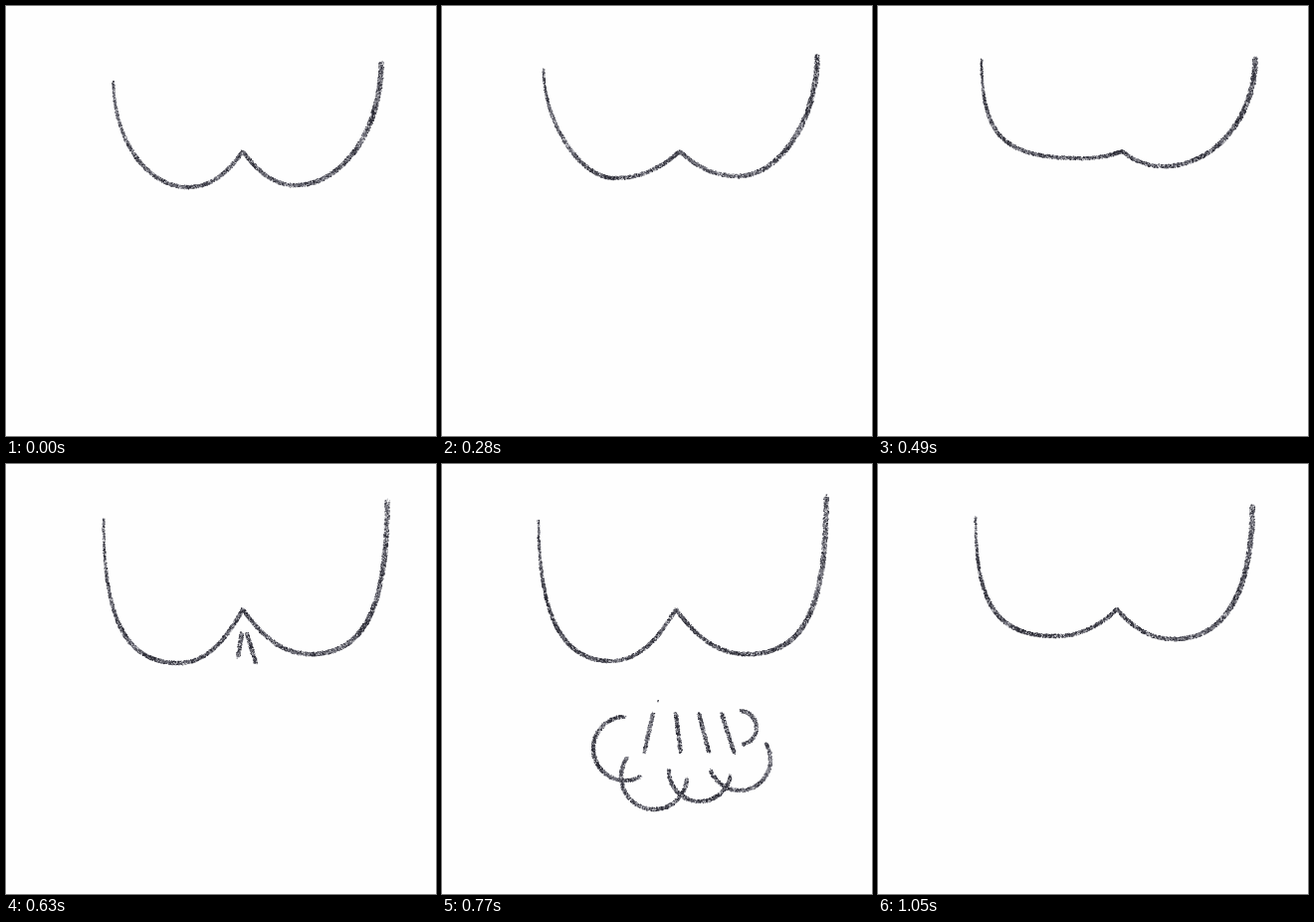
Recreate the animation shown at these times as an HTML page with a canvas. Size 432x432 px, loop 1120 ms.

```html
<!DOCTYPE html>
<html lang="en">
<head>
<meta charset="utf-8">
<title>Crayon puff</title>
<style>
  html, body { margin: 0; width: 100%; height: 100%; overflow: hidden; background: #fefefe; }
  canvas { display: block; width: 432px; height: 432px; }
</style>
</head>
<body>
<canvas id="stage" width="432" height="432"></canvas>
<script>
const ctx = document.getElementById('stage').getContext('2d');
const STEP = 70, STEPS = 16, CLEFT_Y = 146;

// A pose: outer end and lowest point of each lobe, the cleft's x,
// and how boxy each lobe is (0.55 is a plain ellipse).
const pose = (at, left, leftLow, cleft, rightLow, right, bulge) =>
  ({ at, values: [...left, ...leftLow, cleft, ...rightLow, ...right, ...bulge] });

const poses = [
  pose(0, [108, 76], [183, 182], 238, [291, 180], [377, 57], [0.55, 0.55]),
  pose(4, [102, 64], [173, 173], 239, [297, 171], [377, 50], [0.48, 0.53]),
  pose(7, [104, 54], [205, 153], 245, [287, 161], [379, 53], [0.78, 0.55]),
  pose(9, [98, 55], [173, 200], 238, [306, 191], [383, 37], [0.7, 0.7]),
  pose(11, [97, 57], [169, 198], 235, [306, 191], [386, 33], [0.67, 0.72]),
  pose(13, [98, 55], [187, 181], 236, [300, 179], [376, 46], [0.67, 0.7]),
  pose(15, [98, 54], [178, 173], 240, [297, 176], [376, 43], [0.73, 0.65])
];
poses.push({ ...poses[0], at: STEPS });

const lerp = (a, b, t) => a + (b - a) * t;

function seeded(seed) {
  let s = seed * 7919 + 17;
  return () => {
    s = (s + 0x6D2B79F5) | 0;
    let t = Math.imul(s ^ (s >>> 15), 1 | s);
    t = (t + Math.imul(t ^ (t >>> 7), 61 | t)) ^ t;
    return ((t ^ (t >>> 14)) >>> 0) / 4294967296;
  };
}

// Points about half a pixel apart along a parametric curve.
function sample(length, at) {
  const n = Math.ceil(length * 2);
  return Array.from({ length: n }, (_, i) => at(i / n));
}

const gap = (a, b) => Math.hypot(b[0] - a[0], b[1] - a[1]);

const line = (a, b) => sample(gap(a, b), t => [lerp(a[0], b[0], t), lerp(a[1], b[1], t)]);

const bezier = (a, b, c, d) => sample(gap(a, b) + gap(b, c) + gap(c, d), t => {
  const u = 1 - t;
  return [0, 1].map(j => u * u * u * a[j] + 3 * u * u * t * b[j] + 3 * u * t * t * c[j] + t * t * t * d[j]);
});

const arc = (x, y, r, from, to) => sample(r * (to - from) * Math.PI / 180, t => {
  const angle = lerp(from, to, t) * Math.PI / 180;
  return [x + r * Math.cos(angle), y + r * Math.sin(angle)];
});

// From the outer end down to the lowest point, then up to the cleft.
function lobe([ex, ey], [lx, ly], cx, k) {
  const side = bezier([ex, ey], [ex, lerp(ey, ly, k)], [lerp(lx, ex, k), ly], [lx, ly]);
  const inner = bezier([lx, ly], [lerp(lx, cx, 0.5), ly],
    [lerp(cx, lx, 0.2), lerp(CLEFT_Y, ly, 0.42)], [cx, CLEFT_Y]);
  return [...side, ...inner];
}

// Grainy stroke made of small specks; tone drifts along the line.
function crayon(path, width, rnd) {
  const span = 24;
  let from = rnd(), to = rnd();
  path.forEach(([x, y], i) => {
    if (i % span === 0) { from = to; to = rnd(); }
    const tone = lerp(from, to, (i % span) / span);
    const w = width(i / path.length);
    for (let k = 0; k < w * 1.1; k++) {
      const angle = rnd() * Math.PI * 2;
      const r = Math.sqrt(rnd()) * w / 2;
      const size = 0.8 + rnd() * 0.5;
      const pick = rnd();
      ctx.fillStyle = pick < 0.2 + tone * 0.55 ? '#292933' : pick < 0.82 ? '#71717b' : '#d6d6da';
      ctx.fillRect(x + Math.cos(angle) * r - size / 2, y + Math.sin(angle) * r - size / 2, size, size);
    }
  });
}

function outline(step, rnd) {
  const i = poses.findIndex(p => p.at > step);
  const a = poses[i - 1], b = poses[i];
  const t = (step - a.at) / (b.at - a.at);
  const [x1, y1, lx1, ly1, cx, lx2, ly2, x2, y2, k1, k2] = a.values.map((v, j) => lerp(v, b.values[j], t));
  crayon(lobe([x1, y1], [lx1, ly1], cx, k1), s => 2.2 + Math.min(1, s * 3) * 1.6, rnd);
  crayon(lobe([x2, y2], [lx2, ly2], cx, k2), s => 5.4 - s * 1.8, rnd);
}

// Two short marks under the cleft.
function firstMarks(rnd) {
  for (let i = 0; i < 2; i++) {
    crayon(line([237 + 5 * i, 170], [233 + 18 * i, 194 + 6 * i]), () => 4.2, rnd);
  }
}

// The cloud widens and sinks; grow is 0 when it is fully formed.
function cloud(grow, rnd) {
  const cut = 20 * Math.max(0, grow);
  const puffs = [
    arc(184, 286, 32, 62 + cut, 270 - cut),
    arc(213, 314, 33, 5 + cut, 215 - cut),
    arc(259, 308, 31, 10 + cut, 182 - cut),
    arc(299, 297, 31, cut - 30, 160 - cut),
    arc(299, 265, 17, cut - 85, 80 - cut)
  ];
  const streaks = [0, 1, 2, 3].map(i => {
    const x = 212 + 23 * i;
    return line([x, 251], [x + 14 - 23 * 0.4 ** i, 290]);
  });
  const speck = line([217, 238], [217, 239]);
  const parts = grow > 0 ? puffs : [...puffs, ...streaks];
  const place = ([x, y]) => [240 + (x - 240) * 1.68 ** grow, 247 + 29 * grow + (y - 247) * 1.06 ** grow];
  parts.forEach(part => crayon(part.map(place), () => 3.9, rnd));
  if (grow === 0) crayon(speck, () => 1, rnd);
}

function draw(step) {
  const rnd = seeded(step + 1);
  ctx.fillStyle = '#fefefe';
  ctx.fillRect(0, 0, 432, 432);
  outline(step, rnd);
  if (step === 9) firstMarks(rnd);
  if (step > 9 && step < 13) cloud(step - 11, rnd);
}

let shown = -1;
function tick() {
  const step = Math.floor(performance.now() / STEP) % STEPS;
  if (step !== shown) draw(shown = step);
  requestAnimationFrame(tick);
}
tick();
</script>
</body>
</html>
```
